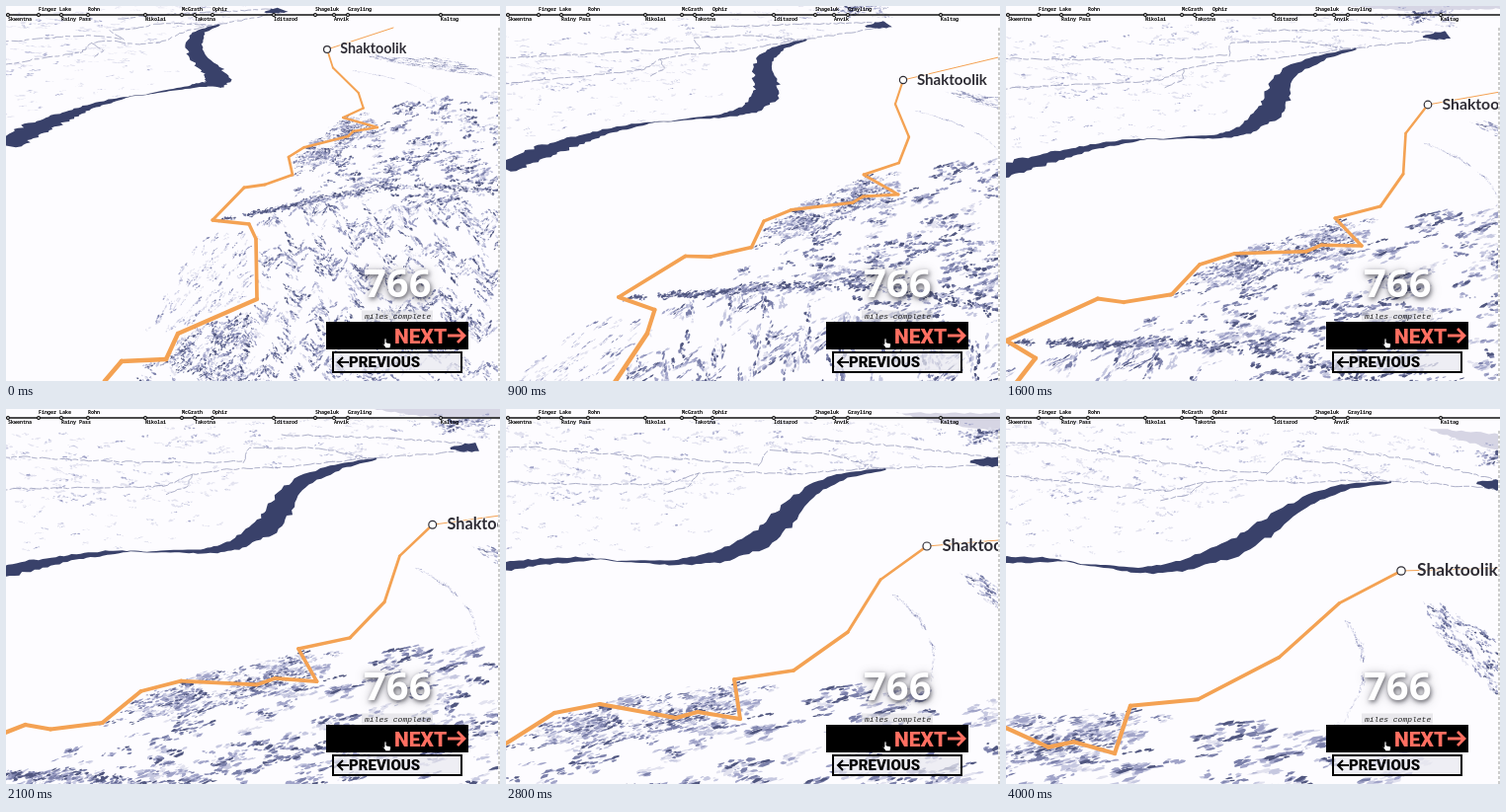
These frames come from a looping animation (500 px wide and 380 px high, 4100 ms). An HTML page with a canvas:

```html
<!DOCTYPE html>
<html lang="en">
<head>
<meta charset="utf-8">
<title>Trail map</title>
<style>
  html, body { margin: 0; width: 500px; height: 380px; overflow: hidden; background: #fdfcff; }
  canvas, svg { position: absolute; left: 0; top: 0; }
  #stops text { font: bold 5px "Noto Sans Mono", "DejaVu Sans Mono", monospace; }
  #label { font-family: Lato, sans-serif; font-weight: bold; fill: #2f2d36; stroke: #fff; stroke-width: 2px; stroke-opacity: .7; paint-order: stroke; }
  #miles { font: bold 40px "Open Sans", "Noto Sans", sans-serif; fill: #fff; filter: drop-shadow(1px 2px 2px rgba(40, 40, 50, .6)) drop-shadow(0 1px 5px rgba(40, 40, 50, .3)); }
  #unit { font: italic 8px "Liberation Mono", monospace; fill: #222; }
  .button { font-family: Roboto, sans-serif; font-weight: 900; }
</style>
</head>
<body>
<canvas id="map" width="500" height="380"></canvas>
<svg width="500" height="380">
  <clipPath id="view"><rect width="498" height="380"/></clipPath>
  <g clip-path="url(#view)">
    <circle id="marker" fill="#fff" stroke="#2f2d36" stroke-width="1.2"/>
    <text id="label">Shaktoolik</text>
  </g>
  <rect x="498" y="22" width="2" height="358" fill="#fff"/>
  <path d="M499 22V380" stroke="#999" stroke-dasharray="3 2"/>
  <g id="stops"><path d="M0 9H500" stroke="#111" stroke-width="1.6"/></g>
  <text id="miles" x="362" y="295">766</text>
  <rect x="360" y="308.500" width="72" height="11" fill="#dcdce0" fill-opacity=".6"/>
  <text id="unit" x="363" y="316.500">miles complete</text>
  <rect x="324" y="320" width="144" height="28"/>
  <text class="button" x="393" y="342" font-size="21" fill="#ff6f61">NEXT</text>
  <path d="M447 334H464M457 327L464 334L457 341" fill="none" stroke="#ff6f61" stroke-width="2.800"/>
  <rect x="331" y="351" width="130" height="20" fill="#e9e9ef" fill-opacity=".7" stroke="#000" stroke-width="2"/>
  <text class="button" x="347" y="366" font-size="15">PREVIOUS</text>
  <path d="M347 361H336M341 356L336 361L341 366" fill="none" stroke="#000" stroke-width="2"/>
  <path d="M383 337.500q1-1.500 2 0v3.500l3.500 .8q1.300 .5 1 2l-.8 3h-4.200l-3-4q.2-1.200 1.500-.3z" fill="#fff" stroke="#000" stroke-width=".8"/>
</svg>
<script>
const LOOP = 4100, STEP = 100;
const pairs = s => s.split(' ').map(p => p.split(',').map(Number));

// The camera is given by where a few places on the ground lie at these times.
const KEYS = [0, 900, 1600, 2800, 4000];
const anchors = [
  '325,44 402,75 427,100 426,139 400,164',
  '376,123 397,191 360,243 237,314 110,349',
  '286,153 261,218 196,262 49,308 -68,324',
  '209,217 114,295 0,339 -212,385 -415,400',
  '212,19 300,34 350,43 380,60 386,73',
  '230,70 282,88 288,106 281,133 254,143',
  '140,90 165,117 157,135 110,154 74,157',
  '82,48 143,66 160,77 164,79 164,86'
].map(pairs);

// Lagrange polynomial through the key positions.
function pose(t) {
  const weights = KEYS.map(k => KEYS.reduce((w, j) => j === k ? w : w * (t - j) / (k - j), 1));
  return anchors.map(track => [0, 1].map(axis => track.reduce((sum, p, i) => sum + weights[i] * p[axis], 0)));
}

function solve(m) {
  const n = m.length;
  for (let c = 0; c < n; c++) {
    let p = c;
    for (let r = c + 1; r < n; r++) if (Math.abs(m[r][c]) > Math.abs(m[p][c])) p = r;
    [m[c], m[p]] = [m[p], m[c]];
    for (let r = 0; r < n; r++) {
      if (r === c) continue;
      const f = m[r][c] / m[c][c];
      for (let k = c; k <= n; k++) m[r][k] -= f * m[c][k];
    }
  }
  return m.map((row, i) => row[n] / row[i]);
}

// Least-squares perspective between two poses, plus a local correction at the anchors.
function makeWarp(from, to) {
  const [ox, oy] = from[0], [px, py] = to[0];
  const m = Array.from({ length: 8 }, () => Array(9).fill(0));
  const add = row => {
    for (let i = 0; i < 8; i++) for (let j = 0; j < 9; j++) m[i][j] += row[i] * row[j];
  };
  from.forEach(([fx, fy], i) => {
    const x = (fx - ox) / 100, y = (fy - oy) / 100;
    const X = (to[i][0] - px) / 100, Y = (to[i][1] - py) / 100;
    add([x, y, 1, 0, 0, 0, -X * x, -X * y, X]);
    add([0, 0, 0, x, y, 1, -Y * x, -Y * y, Y]);
  });
  const h = solve(m);
  const project = (fx, fy) => {
    const x = (fx - ox) / 100, y = (fy - oy) / 100, w = h[6] * x + h[7] * y + 1;
    return [px + 100 * (h[0] * x + h[1] * y + h[2]) / w, py + 100 * (h[3] * x + h[4] * y + h[5]) / w, w];
  };
  const errors = from.map(([x, y], i) => {
    const p = project(x, y);
    return [to[i][0] - p[0], to[i][1] - p[1]];
  });
  const shift = (x, y) => {
    let sx = 0, sy = 0, sum = 0;
    from.forEach(([ax, ay], i) => {
      const k = 1 / ((x - ax) ** 2 + (y - ay) ** 2 + 40) ** 2;
      sx += k * errors[i][0]; sy += k * errors[i][1]; sum += k;
    });
    return [sx / sum, sy / sum];
  };
  const place = (x, y) => {
    const [X, Y, w] = project(x, y), [sx, sy] = shift(x, y);
    return [X + sx, Y + sy, w];
  };
  return { project, shift, place };
}

let seed = 20;
const rand = () => (seed = (seed * 16807) % 2147483647) / 2147483647;
const spread = a => (rand() * 2 - 1) * a;

const ctx = document.getElementById('map').getContext('2d');
const SHADES = ['#e2e2ef', '#c6c8e0', '#a0a3c8', '#7a7fa9', '#50567f'];
const NEAR = 0, WIDE = 2800, END = 4000;
const specks = SHADES.map(() => []);

// A spur is a short ragged row of specks.
function addSpur(ref, x, y, size, angle, bias) {
  const ca = Math.cos(angle), sa = Math.sin(angle);
  const base = rand() * 4 + bias;
  for (let i = -2; i <= 3; i++) {
    const along = i * size * .9 + spread(size), side = spread(size * .7);
    const cx = x + along * ca - side * sa, cy = y + along * sa + side * ca;
    const long = size * (.5 + rand() * .9), thin = long * (.3 + rand() * .4), shape = [];
    for (let k = 0; k < 5; k++) {
      const r = .5 + rand() * .7, a = k * Math.PI * .4, u = Math.cos(a) * r * long, v = Math.sin(a) * r * thin;
      shape.push([cx + u * ca - v * sa, cy + u * sa + v * ca]);
    }
    const shade = Math.max(0, Math.min(4, Math.floor(base + spread(1))));
    specks[shade].push({ ref, x: cx, y: cy, shape });
  }
}
function scatter(ref, outline, count, size, bias, tilt, keep = () => true) {
  const pts = pairs(outline), xs = pts.map(p => p[0]), ys = pts.map(p => p[1]);
  const area = new Path2D('M' + outline.replaceAll(' ', 'L') + 'Z');
  const x0 = Math.min(...xs), y0 = Math.min(...ys), w = Math.max(...xs) - x0, h = Math.max(...ys) - y0;
  while (count > 0) {
    const x = x0 + rand() * w, y = y0 + rand() * h;
    if (!ctx.isPointInPath(area, x, y)) continue;
    count--;
    if (keep(x, y)) addSpur(ref, x, y, size, tilt(x, y), bias);
  }
}
function sprinkle(ref, line, count, width, size, bias) {
  const pts = pairs(line);
  while (count--) {
    const u = rand() * (pts.length - 1), i = Math.floor(u), f = u - i;
    const [[x, y], [x2, y2]] = [pts[i], pts[i + 1]];
    addSpur(ref, x + (x2 - x) * f + spread(width), y + (y2 - y) * f + spread(width),
      size, Math.atan2(y2 - y, x2 - x) + spread(.5), bias);
  }
}

// Herringbone ribs below the valley, flatter streaks above it.
const rib = (x, y) => x / 32 + .8 * Math.sin(y / 60);
const hillTilt = (x, y) => (y < 200 ? -.2 : rib(x, y) % 1 < .5 ? .75 : -.75) + spread(.3);
const hillKeep = (x, y) => .6 * Math.sin(rib(x, y) * 2 * Math.PI) + Math.sin(y / 8 + 2 * Math.sin(x / 21)) > spread(1) - .1;
const lean = angle => () => angle + spread(.35);

scatter(NEAR, '300,143 345,112 385,102 440,93 500,86 640,92 640,400 105,400 150,366 176,336 256,300 257,240 246,222 292,205',
  4300, 1.7, .2, hillTilt, hillKeep);
scatter(NEAR, '292,155 345,112 378,121 352,132 330,160 293,172', 190, 1.2, .3, lean(-.3));
scatter(NEAR, '195,235 245,228 250,295 180,325 140,330', 130, 1.3, -1, lean(-.8));
scatter(NEAR, '120,365 165,362 178,334 252,302 240,380', 130, 1.6, .6, lean(-.6));
scatter(END, '414,196 440,198 500,232 560,250 560,340 500,292 450,245', 230, 1.8, .2, lean(.7));
sprinkle(NEAR, '218,217 280,205 340,190 420,182 500,188', 130, 2, 1.4, 1.2);
sprinkle(WIDE, '393,188 418,212 433,240 431,272 405,300', 45, 1.2, 1, -1.2);
scatter(WIDE, '-100,85 -60,12 520,12 520,56 330,62 180,100', 260, 1.6, -1.8, lean(0));
scatter(WIDE, '-60,85 190,85 215,128 100,148 -60,145', 60, 1.3, -2, lean(0));
scatter(WIDE, '462,23 520,22 520,36 470,34', 25, 2, .6, lean(0));

// Splits every edge and jitters the new points; a third value is carried along.
function rough(line, amount) {
  const pts = pairs(line), out = [];
  for (let i = 1; i < pts.length; i++) {
    const a = pts[i - 1], b = pts[i], n = Math.ceil(Math.hypot(b[0] - a[0], b[1] - a[1]) / 5);
    for (let k = 0; k < n; k++) {
      const [x, y, w] = a.map((v, j) => v + (b[j] - v) * k / n);
      out.push([x + spread(amount), y + spread(amount), w]);
    }
  }
  out.push(pts.at(-1));
  return out;
}
// Outline around a centre line of x, y, half width.
function ribbon(line) {
  const mid = rough(line, .5);
  const bank = sign => mid.map(([x, y, half], i) => {
    const a = mid[Math.max(0, i - 2)], b = mid[Math.min(mid.length - 1, i + 2)];
    const dx = b[0] - a[0], dy = b[1] - a[1], k = sign * (half + spread(half * .2)) / Math.hypot(dx, dy);
    return [x - dy * k, y + dx * k];
  });
  return [...bank(1), ...bank(-1).reverse()];
}
const haze = rough('395,4 580,4 580,26 485,21 440,14 395,4', 1);
const water = [
  '384,61,1 345,67,3 314,79,6 297,94,8 280,112,10.5 264,128,11.5 242,139,9 215,150,6 170,156,2.5 112,154,.5 92,152,.5 70,152.5,2.5 40,154.5,3 0,159,5 -50,166,7 -110,180,7',
  '470,53,1 484,54,4 500,53,5'
].map(ribbon);
const cracks = [
  '-60,72 0,74 60,76 160,76', '160,77 195,65 230,63 290,66 340,62 383,60', '195,65 184,79 160,86',
  '383,60 430,59 500,57', '255,57 266,42 330,46 380,61', '300,29 400,38 500,50', '-60,42 20,38 90,45 200,52 255,56'
].map(s => rough(s, .9));

const coast = pairs('426,139 379,173 346,226 291,265 231,274 237,314 194,307 172,313 95,299 49,308');
const inland = pairs('290,171 262,181 241,184 209,217 246,221 253,236 254,297 174,332 162,358 117,360 100,380');
const onward = [392, 22];

const marker = document.getElementById('marker'), label = document.getElementById('label');
const set = (el, attrs) => Object.entries(attrs).forEach(([k, v]) => el.setAttribute(k, v));

function trace(pts) {
  ctx.beginPath();
  pts.forEach(([x, y]) => ctx.lineTo(x, y));
}

function drawSpecks(warps) {
  specks.forEach((group, shade) => {
    ctx.beginPath();
    for (const { ref, x, y, shape } of group) {
      const warp = warps[ref], [cx, cy, w] = warp.project(x, y);
      if (w < .12 || cx < -40 || cx > 540 || cy < -30 || cy > 410) continue;
      const [sx, sy] = warp.shift(x, y);
      shape.forEach(([bx, by], i) => {
        const [X, Y] = warp.project(bx, by);
        ctx[i ? 'lineTo' : 'moveTo'](X + sx, Y + sy);
      });
    }
    ctx.fillStyle = SHADES[shade];
    ctx.fill();
  });
}

function drawRoute(warps) {
  const near = p => warps[NEAR].place(...p), wide = p => warps[WIDE].place(...p);
  const pts = [...coast.map(wide), ...inland.map(near)];
  const segment = (a, b, width) => {
    ctx.lineWidth = width;
    trace([a, b]);
    ctx.stroke();
  };
  ctx.strokeStyle = '#f4a253';
  ctx.lineCap = 'round';
  segment(pts[0], near(onward), 1);
  for (let i = 1; i < pts.length && pts[i][2] > .12; i++) {
    segment(pts[i - 1], pts[i], 1.3 + Math.min(380, (pts[i - 1][1] + pts[i][1]) / 2) * .009);
  }
  const [x, y] = pts[0], size = 14.3 + (y - 44) * .026;
  set(marker, { cx: x, cy: y, r: size * .24 });
  set(label, { x: x + size * .92, y: y + size * .3, 'font-size': size });
}

function draw(t) {
  const now = pose(t), warps = {};
  for (const ref of [NEAR, WIDE, END]) warps[ref] = makeWarp(pose(ref), now);
  const wide = pts => trace(pts.map(([x, y]) => warps[WIDE].place(x, y)));
  ctx.fillStyle = '#fdfcff';
  ctx.fillRect(0, 0, 500, 380);
  ctx.fillStyle = '#d6d5e4';
  wide(haze);
  ctx.fill();
  drawSpecks(warps);
  ctx.lineWidth = .7;
  ctx.strokeStyle = '#8a8eb0';
  ctx.setLineDash([11, 2, 5, 3]);
  for (const line of cracks) { wide(line); ctx.stroke(); }
  ctx.setLineDash([]);
  ctx.fillStyle = '#39416a';
  for (const body of water) { wide(body); ctx.fill(); }
  drawRoute(warps);
}

function addStops() {
  const above = { 'Finger Lake': 33, Rohn: 83, McGrath: 178, Ophir: 209, Shageluk: 313, Grayling: 346 };
  const below = { Skwentna: 2, 'Rainy Pass': 56, Nikolai: 141, Takotna: 191, Iditarod: 271, Anvik: 332, Kaltag: 440 };
  const make = (tag, attrs) => {
    const el = document.createElementNS('http://www.w3.org/2000/svg', tag);
    set(el, attrs);
    return document.getElementById('stops').appendChild(el);
  };
  for (const [names, y] of [[above, 5], [below, 15]]) {
    for (const [name, x] of Object.entries(names)) {
      make('circle', { cx: x, cy: 9, r: 1.7, fill: '#999', stroke: '#111', 'stroke-width': .9 });
      make('text', { x, y }).textContent = name;
    }
  }
}

let shown = -1;
function tick() {
  const step = Math.floor(performance.now() % LOOP / STEP);
  if (step !== shown) draw((shown = step) * STEP);
  requestAnimationFrame(tick);
}
addStops();
tick();
</script>
</body>
</html>
```
